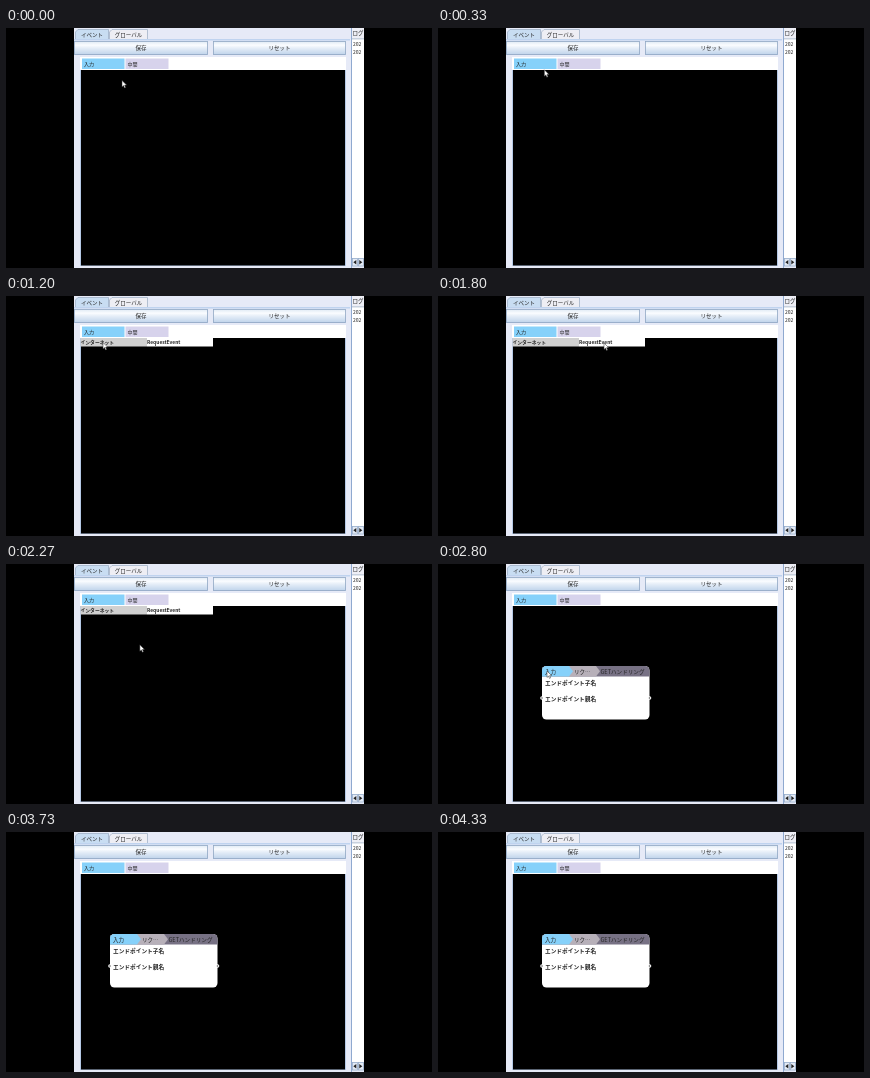
Animation of 426 by 240 pixels, one loop 4.39 s. Source, as an HTML page with a canvas:

```html
<!DOCTYPE html>
<html lang="ja">
<head>
<meta charset="utf-8">
<title>Event editor</title>
<style>
html, body { margin: 0; width: 100%; height: 100%; overflow: hidden; background: #000; }
canvas { display: block; width: 426px; height: 240px; }
</style>
</head>
<body>
<canvas id="stage"></canvas>
<script>
const W = 426, H = 240, LOOP = 4390, FPS = 15;
const MENU = 530, SUBMENU = 1060, DROP = 2530;
const FONT = '"Noto Sans CJK JP", "Noto Sans CJK", "Noto Sans", sans-serif';

// time, x, y of the pointer tip
const PATH = [
  [0, 116, 52.5], [530, 102, 37], [850, 102, 37], [1130, 97, 46.5],
  [1330, 97, 46.5], [1730, 166, 47], [1990, 166, 47],
  [2500, 109, 107], [2950, 109, 107], [3400, 60, 150]
];

const canvas = document.getElementById('stage');
const ctx = canvas.getContext('2d');
const dpr = window.devicePixelRatio || 1;
canvas.width = W * dpr;
canvas.height = H * dpr;
ctx.scale(dpr, dpr);

function rect(x, y, w, h, color) {
  ctx.fillStyle = color;
  ctx.fillRect(x, y, w, h);
}

function frame(x, y, w, h, color) {
  ctx.strokeStyle = color;
  ctx.lineWidth = 0.8;
  ctx.strokeRect(x + 0.5, y + 0.5, w - 1, h - 1);
}

function poly(points, color) {
  ctx.beginPath();
  points.forEach(([x, y]) => ctx.lineTo(x, y));
  ctx.closePath();
  ctx.fillStyle = color;
  ctx.fill();
}

function text(s, x, y, size, weight = 500, align = 'left', color = '#222') {
  ctx.font = `${weight} ${size}px ${FONT}`;
  ctx.textAlign = align;
  ctx.textBaseline = 'alphabetic';
  ctx.fillStyle = color;
  ctx.fillText(s, x, y + size * 0.37);
}

function tab(x, w, label, selected) {
  poly([[x, 12], [x, 4], [x + 3, 1], [x + w, 1], [x + w, 12]], selected ? '#c8ddf2' : '#eeeef4');
  ctx.beginPath();
  ctx.moveTo(x + 0.5, 12);
  ctx.lineTo(x + 0.5, 4);
  ctx.lineTo(x + 3, 1.5);
  ctx.lineTo(x + w - 0.5, 1.5);
  ctx.lineTo(x + w - 0.5, 12);
  ctx.strokeStyle = '#a3b3c8';
  ctx.lineWidth = 0.8;
  ctx.stroke();
  text(label, x + w / 2, 6.7, 5.5, 500, 'center');
}

function button(x, w, label) {
  const g = ctx.createLinearGradient(0, 13, 0, 27);
  g.addColorStop(0, '#dde8f3');
  g.addColorStop(0.3, '#fafcff');
  g.addColorStop(0.5, '#e6eef8');
  g.addColorStop(1, '#bdd2ea');
  rect(x, 13, w, 14, g);
  frame(x, 13, w, 14, '#91a7c4');
  text(label, x + w / 2, 20, 5.5, 500, 'center');
}

function drawWindow() {
  rect(68, 0, 290, 240, '#e6eaf7');
  tab(69, 34, 'イベント', true);
  tab(103, 39, 'グローバル', false);
  rect(68, 11, 276, 1.5, '#bfd3ef');
  button(68, 134, '保存');
  button(207, 133, 'リセット');

  rect(74, 29, 266, 13, '#fff');
  rect(76, 30.5, 42.5, 10.5, '#86d1fa');
  rect(119.5, 30.5, 43, 10.5, '#d7d3ec');
  text('入力', 78, 35.8, 5);
  text('中間', 121.5, 35.8, 5);

  rect(74, 42, 266, 196, '#b5c9e6');
  rect(75, 42, 264, 195.5, '#000');

  rect(345, 0, 1, 240, '#8fa9d0');
  rect(346, 0, 12, 11, '#eeeff6');
  text('ログ', 346.5, 5, 5.5);
  rect(346, 11, 12, 219, '#fff');
  rect(346, 10.5, 12, 0.8, '#a3b3c8');
  text('202', 347, 16.2, 5, 400);
  text('202', 347, 24.2, 5, 400);
  rect(346, 230, 12, 8.5, '#e3eaf5');
  frame(346, 230, 6, 8.5, '#9aaecb');
  frame(352, 230, 6, 8.5, '#9aaecb');
  poly([[347.3, 234.2], [350.3, 232], [350.3, 236.4]], '#222');
  poly([[356.3, 234.2], [353.3, 232], [353.3, 236.4]], '#222');
}

function drawMenus(t) {
  if (t < MENU || t >= DROP) return;
  const open = t >= SUBMENU;
  rect(74.5, 42, 66.5, 8.5, open ? '#d0d0d0' : '#fff');
  text('インターネット', 74.5, 45.8, 4.8, 600);
  if (!open) return;
  rect(141, 42, 66, 8.5, '#fff');
  text('RequestEvent', 141, 45.8, 4.9, 600);
}

function port(x, y) {
  ctx.beginPath();
  ctx.arc(x, y, 1.8, 0, Math.PI * 2);
  ctx.fillStyle = '#fff';
  ctx.fill();
  ctx.beginPath();
  ctx.arc(x, y, 0.8, 0, Math.PI * 2);
  ctx.fillStyle = '#555';
  ctx.fill();
}

function arrowBand(x, end, color) {
  poly([[x, 102], [end, 102], [end + 4, 107.2], [end, 112.5], [x, 112.5]], color);
}

function drawNode(t) {
  if (t < DROP) return;
  ctx.save();
  ctx.beginPath();
  ctx.roundRect(104, 102, 107.5, 53.5, 4.5);
  ctx.clip();
  rect(104, 102, 108, 54, '#fff');
  rect(104, 102, 108, 10.5, '#777184');
  arrowBand(104, 158, '#b7b0b9');
  arrowBand(104, 131, '#86d1fa');
  ctx.restore();
  text('入力', 107, 107.6, 5.5);
  text('リク…', 136, 107.6, 5.5);
  text('GETハンドリング', 162.5, 107.6, 5.6);
  text('エンドポイント子名', 107, 118.6, 5.7, 600);
  text('エンドポイント親名', 107, 134.4, 5.7, 600);
  port(104, 134);
  port(211.5, 134);
}

function pointerAt(t) {
  const i = PATH.findIndex(p => p[0] > t);
  if (i < 1) return null;
  const [t0, x0, y0] = PATH[i - 1];
  const [t1, x1, y1] = PATH[i];
  const u = (t - t0) / (t1 - t0);
  const k = u * u * (3 - 2 * u);
  return [x0 + (x1 - x0) * k, y0 + (y1 - y0) * k];
}

function drawPointer(t) {
  const p = pointerAt(t);
  if (!p) return;
  ctx.save();
  ctx.translate(p[0], p[1]);
  poly([[0, 0], [0, 6.4], [1.5, 5.1], [2.5, 7.4], [3.6, 6.9], [2.6, 4.7], [4.6, 4.6]], '#fff');
  ctx.strokeStyle = '#333';
  ctx.lineWidth = 0.5;
  ctx.stroke();
  ctx.restore();
}

function draw(now) {
  const step = Math.floor((now % LOOP + 5) * FPS / 1000);
  const t = step * 1000 / FPS;
  rect(0, 0, W, H, '#000');
  ctx.save();
  ctx.beginPath();
  ctx.rect(68, 0, 290, H);
  ctx.clip();
  drawWindow();
  drawMenus(t);
  drawNode(t);
  drawPointer(t);
  ctx.restore();
}

let start;
function tick(now) {
  start ??= now;
  draw(Math.max(0, now - start));
  requestAnimationFrame(tick);
}
requestAnimationFrame(tick);
</script>
</body>
</html>
```
